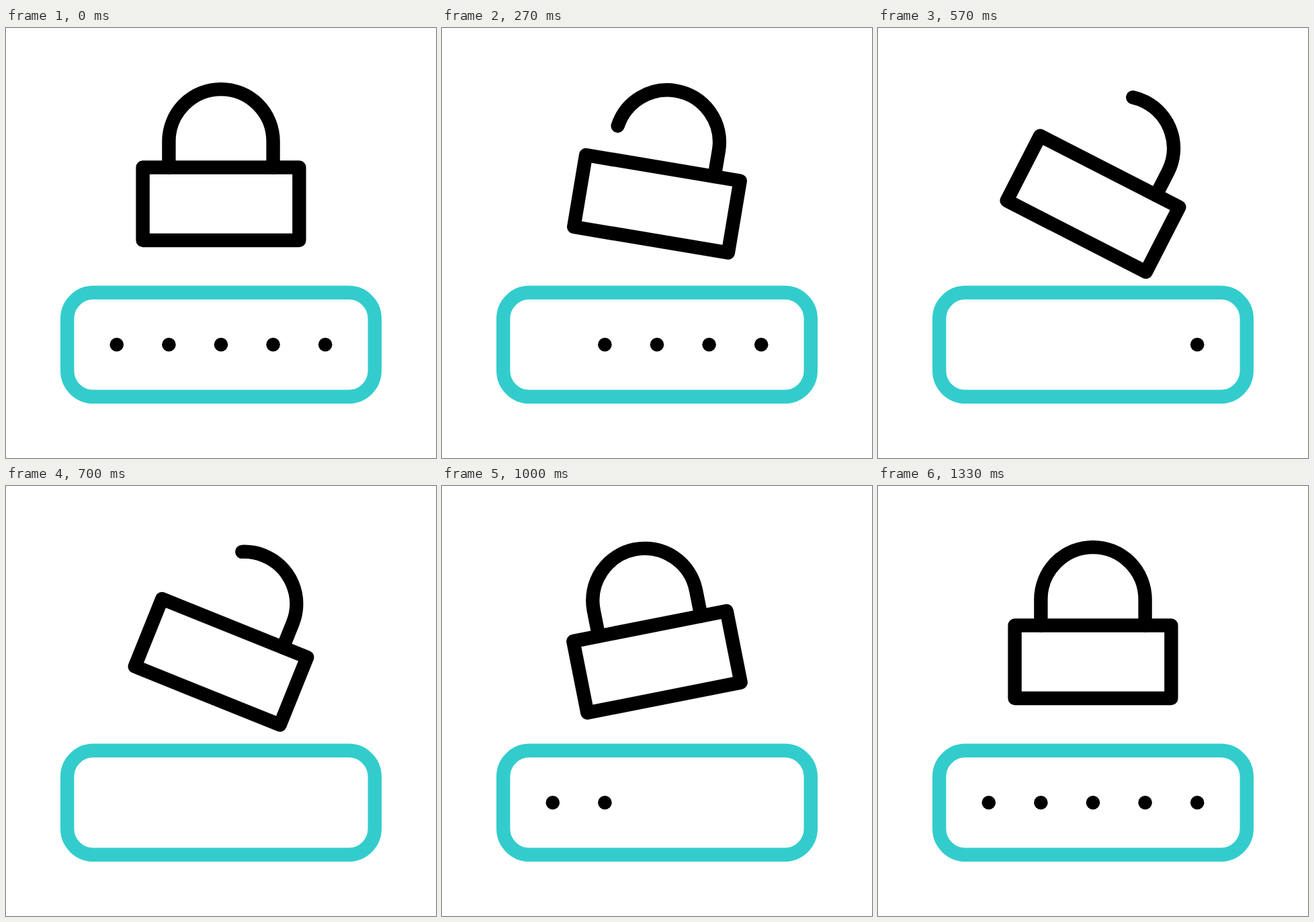
Recreate the animation shown at these times as an HTML page. Size 640 by 640 pixels, loop 2 s.

```html
<!DOCTYPE html>
<html lang="en">
<head>
<meta charset="utf-8">
<title>Lock and passcode</title>
<style>
  html, body { margin: 0; width: 100%; height: 100%; overflow: hidden; background: #fff; }
  svg { display: block; width: 100%; height: 100%; }
</style>
</head>
<body>
<svg viewBox="0 0 640 640" fill="none" stroke-width="20.4" stroke-linecap="round" stroke-linejoin="round">
  <rect x="91.2" y="393.8" width="457.6" height="155" rx="38.8" stroke="#33cccc"/>
  <g id="dots" fill="#000"></g>
  <g id="lock" stroke="#000">
    <path id="shackle" d="M397.6 207.5V168.7A77.6 77.6 0 0 0 242.4 168.7V207.5"/>
    <rect x="203.6" y="207.5" width="232.8" height="108.5"/>
  </g>
</svg>
<script>
const LOOP = 2000, FPS = 30;
const lock = document.getElementById('lock');
const shackle = document.getElementById('shackle');
const dotGroup = document.getElementById('dots');
const shackleLen = shackle.getTotalLength();

const dots = Array.from({ length: 5 }, (_, i) => {
  const dot = document.createElementNS('http://www.w3.org/2000/svg', 'circle');
  dot.setAttribute('cx', 164.8 + 77.6 * i);
  dot.setAttribute('cy', 471.2);
  dot.setAttribute('r', 10.3);
  return dotGroup.appendChild(dot);
});

// Keys are [step, value]
const tilt = [[1, 0], [18.9, 28], [27.9, -16.2], [34, 2.1], [40, 0]];
const opening = [[0.75, 0], [18.9, 0.453], [28.5, 0]];

const ease = u => u * u * (3 - 2 * u);

function valueAt(keys, step) {
  if (step <= keys[0][0]) return keys[0][1];
  for (let i = 1; i < keys.length; i++) {
    const [a, from] = keys[i - 1], [b, to] = keys[i];
    if (step < b) return from + (to - from) * ease((step - a) / (b - a));
  }
  return keys[keys.length - 1][1];
}

function draw(ms) {
  const step = Math.floor((ms + 7) * FPS / 1000) % (LOOP * FPS / 1000);
  lock.setAttribute('transform', `rotate(${valueAt(tilt, step)} 320 261.75)`);
  const shown = shackleLen * (1 - valueAt(opening, step));
  shackle.setAttribute('stroke-dasharray', `${shown} ${shackleLen * 2}`);
  dots.forEach((dot, i) => {
    const hidden = step >= 7 + 3 * i && step < 28 + 2 * i;
    dot.setAttribute('visibility', hidden ? 'hidden' : 'visible');
  });
}

let start = null;
function tick(now) {
  if (start === null) start = now;
  draw((now - start) % LOOP);
  requestAnimationFrame(tick);
}
draw(0);
requestAnimationFrame(tick);
</script>
</body>
</html>
```
